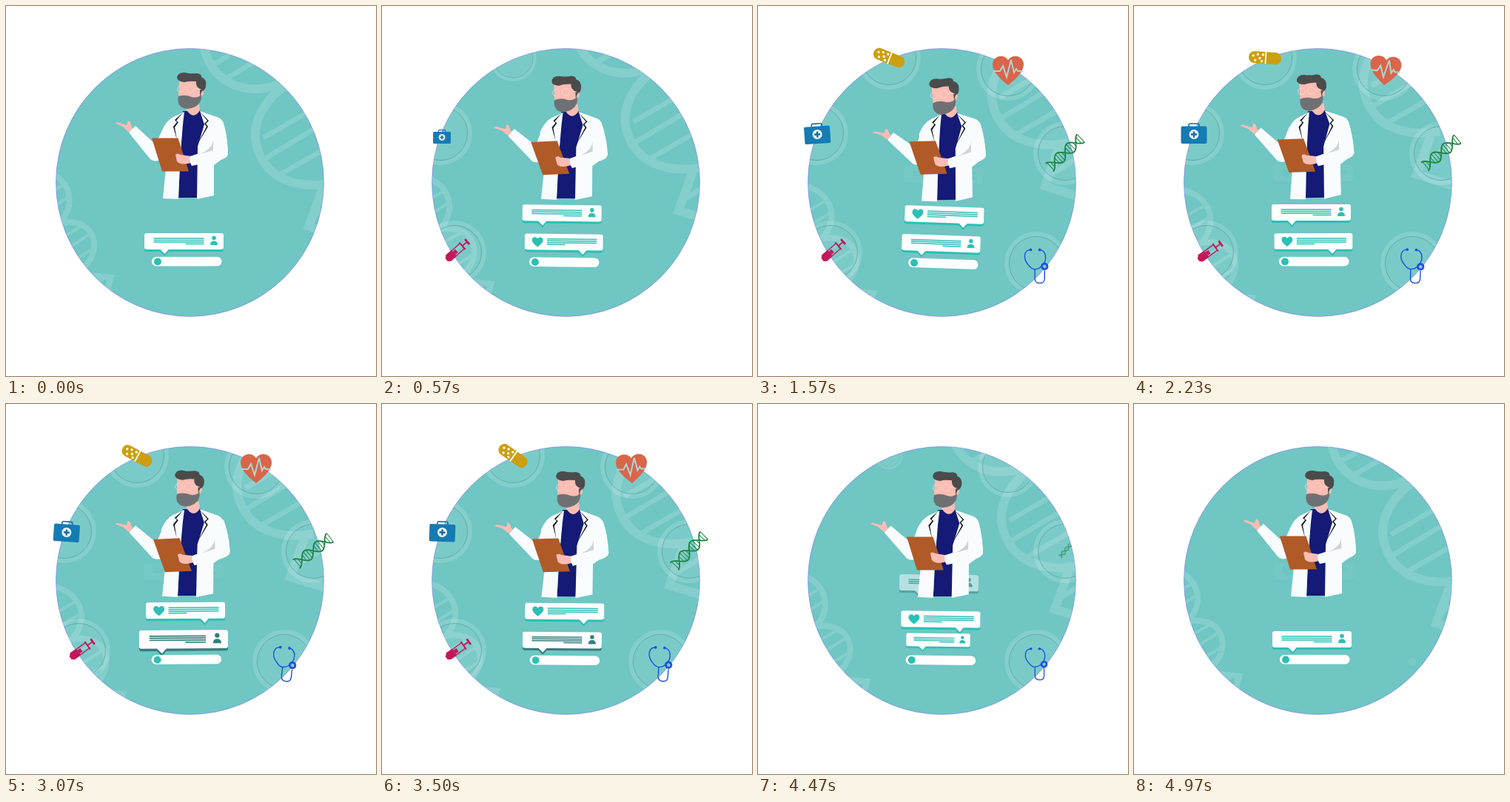
Write an HTML page that moves like this. It is 500 px wide and 500 px high and loops after 5010 ms.

```html
<!DOCTYPE html>
<html lang="en">
<head>
<meta charset="utf-8">
<title>Online doctor</title>
<style>
html, body { margin: 0; width: 100%; height: 100%; overflow: hidden; background: #fff; }
svg { display: block; width: 100vw; height: 100vh; }
</style>
</head>
<body>
<svg viewBox="0 0 500 500">
  <defs>
    <clipPath id="disc"><circle cx="248.500" cy="238.500" r="181"/></clipPath>
    <path id="lines" d="M0 0h68M0 2.500h68M0 5h68" fill="none" stroke-width="1.500"/>
  </defs>

  <circle cx="248.500" cy="238.500" r="181" fill="#6fc6c3" stroke="#7c84e6" stroke-width=".7"/>

  <g clip-path="url(#disc)">
    <g id="helixRight" opacity=".15" fill="none" stroke="#fff" stroke-width="12">
      <path d="M250 -20C264 -8 262 30 268 58C278 98 312 117 350 111C374 106 392 96 440 60"/>
      <path d="M400 94C350 118 327 160 341 196C354 232 390 248 440 240"/>
      <path d="M428 246L409 298L470 317"/>
      <path stroke-width="7" d="M276 81L302 67M292 101L342 72M348 178L412 141M350 206L422 163M370 228L440 188M414 284L450 262"/>
    </g>
    <g id="helixLeft" opacity=".15" fill="none" stroke="#fff" stroke-width="8">
      <path d="M50 222C88 232 95 268 74 291M40 305C88 280 122 294 119 328C116 348 102 358 74 376"/>
      <path d="M101 363L142 367L134 392"/>
      <path stroke-width="4" d="M55 255L78 242M56 276L84 258M72 315L103 297M78 331L114 308M82 349L116 329M112 380L134 367"/>
    </g>
    <g id="rings"></g>
  </g>

  <g id="chat">
    <g id="messages"></g>
    <rect x="197" y="339" width="94.500" height="12.500" rx="6.200" fill="#fff"/>
    <circle cx="205" cy="345.500" r="5" fill="#2dbfb5"/>
  </g>

  <g id="torso">
    <path fill="#f9bdb3" d="M245 132H261L263 149Q254 156 243 149Z"/>
    <path fill="#141a75" d="M239 142L245 142Q254 154 262 141L268 150L272 162L258 259H233Z"/>
    <g id="backArm">
      <path fill="#f9bdb3" d="M147 158L151 157L163 161L165 155L168 157L170 164L175 167L169 172Q162 168 158 163Z"/>
      <path fill="#f8fcfe" d="M175 162L202 187L211 168L226 158L217 204Q202 213 195 207L166 171Z"/>
    </g>
    <path fill="#f8fcfe" d="M241 143L226 150Q216 155 210 170L216 220L212 260L233 261L235 210L239 160Z"/>
    <path fill="#f8fcfe" d="M262 142L285 150Q292 152 294 159Q299 178 300 201L281 215V256L258 261L259 190L268 160Z"/>
    <path fill="#15191d" d="M239 144L228 154L231 157L226 163L231 181L228 164L233 157L230 155ZM261 142L272 155L268 159L271 163L258 188L273 163L270 159L274 155Z"/>
    <g id="frontArm">
      <path fill="#b05a28" d="M197 178.500H232.500L247 223.500H211Z"/>
      <path fill="#f9bdb3" d="M229 201Q231 198 236 201L250 203V212Q236 216 231 210Z"/>
      <path fill="#f8fcfe" d="M249 203L280 193L278 160L293 156Q299 172 300 199Q300 206 286 209L251 216Q247 209 249 203Z"/>
      <path fill="#cdd3d5" d="M280 181Q279 193 262 200L280 195Z"/>
    </g>
  </g>

  <g id="head">
    <path fill="#f9bdb3" d="M234 100L264 101V112Q268 112 267 118Q266 122 263 122L260 134H240L233 124Z"/>
    <path fill="#6e7173" d="M233 122Q242 119 251 123Q260 125 264 119Q265 131 256 136Q244 142 236 136Q231 131 233 122Z"/>
    <path fill="#4b4b4c" d="M231 97Q232 89 242 90Q248 92 258 91Q265 92 264 96Q272 99 270 109Q269 114 265 115L262 121V112Q256 109 257 102Q247 101 241 103Q232 102 231 97Z"/>
    <g fill="none" stroke="#fbd6d0" stroke-width=".8"><circle cx="236" cy="112" r="4.500"/><circle cx="249" cy="112" r="5"/><path d="M254 111L264 113"/></g>
  </g>

  <g id="icons"></g>
</svg>

<script>
const LOOP = 5010, STEP = 100 / 3;
const KEYS = [0, 570, 1570, 2230, 3070, 3930, 4970];
const $ = id => document.getElementById(id);
const clamp = v => Math.max(0, Math.min(1, v));

function add(parent, markup) {
  const g = document.createElementNS('http://www.w3.org/2000/svg', 'g');
  g.innerHTML = markup;
  return parent.appendChild(g);
}
const set = (el, transform) => el.setAttribute('transform', transform);

// Smooth curve through one value per key time, closing on the first value.
function track(t, values) {
  const n = values.length;
  const time = i => i < 0 ? KEYS[n - 1] - LOOP : i > n ? KEYS[1] + LOOP : KEYS[i];
  const value = i => values[(i + n) % n];
  const slope = i => (value(i + 1) - value(i - 1)) / (time(i + 1) - time(i - 1));
  let i = 0;
  while (i < n && t >= KEYS[i + 1]) i++;
  if (i >= n) return values[0];
  const d = KEYS[i + 1] - KEYS[i], u = (t - KEYS[i]) / d, w = 1 - u;
  return w * w * (1 + 2 * u) * value(i) + u * u * (3 - 2 * u) * value(i + 1)
    + d * u * w * (w * slope(i) - u * slope(i + 1));
}

function helixIcon() {
  const half = 29, y = x => 7.5 * Math.cos((x + half) * Math.PI / 19.5);
  let strands = ['', ''], rungs = '';
  for (let x = -half; x <= half; x += 2) {
    strands = strands.map((s, i) => `${s}${s ? 'L' : 'M'}${x} ${i ? -y(x) : y(x)}`);
    if (x % 4 === 1 || x % 4 === -3) rungs += `M${x} ${y(x)}V${-y(x)}`;
  }
  return `<g transform="rotate(-43)" fill="none" stroke="#1c8540"><path stroke-width="1.800" d="${strands.join('')}"/><path d="${rungs}"/></g>`;
}

const dots = [[-16, -2], [-13, 4], [-10, -4], [-7, 1], [-4, 5], [-3, -4]]
  .map(([x, y]) => `<circle cx="${x}" cy="${y}" r="1.700"/>`).join('');

// In order of appearance: ring centre, pivot of the icon, tilt at each key time.
const icons = [
  { ring: [98, 333], pivot: [87, 343], tilt: [-41, -41, -41, -36, -36, -36], art:
    `<g transform="scale(.92)" fill="#c2185b"><path d="M0 -2L4 -6H15V6H4L0 3Z"/><path d="M15 -5H31V5H15" fill="none" stroke="#c2185b" stroke-width="1.500"/>
     <path d="M15 -3H20V3H15ZM31 -1H40V1H31ZM30 -7H32V7H30ZM39 -5H42V5H39Z"/></g>` },
  { ring: [79, 172], pivot: [81, 186], tilt: [0, 0, -4, 0, 4, 0], art:
    `<path d="M-7 -23V-25Q-7 -27 -5 -27H5Q7 -27 7 -25V-23" fill="none" stroke="#176aa6" stroke-width="1.600"/>
     <rect x="-17.500" y="-23.500" width="35" height="23.500" rx="2" fill="#147bb3"/>
     <circle cy="-12.500" r="6.500" fill="#e9f7fa"/><path d="M-4 -12.500H4M0 -16.500V-8.500" stroke="#176aa6" stroke-width="2.500"/>` },
  { ring: [177, 70], pivot: [177, 70], tilt: [22, 22, 22, 4, 28, 37], art:
    `<rect x="-22" y="-8" width="44" height="16" rx="7.500" fill="#cc9f10"/><path d="M1 -8V8" stroke="#fff" stroke-width="1.800"/>
     <g fill="#fff8dc">${dots}</g>` },
  { ring: [338, 85], pivot: [338, 107], tilt: [0, 0, 0, 5, 0, -3], art:
    `<path d="M0 0C-10 -8 -21 -18 -21 -28C-21 -40 -6 -43 0 -34C6 -43 21 -40 21 -28C21 -18 10 -8 0 0Z" fill="#d9654a"/>
     <path d="M-20 -19H-11L-7 -26L-2 -11L4 -34L8 -17L11 -22L13 -19H20" fill="none" stroke="#a9d8d2" stroke-width="2"/>` },
  { ring: [415, 199], pivot: [415, 198.5], tilt: [0, 0, 0, 3, 5, -10], art: helixIcon() },
  { ring: [376, 348], pivot: [376, 351], tilt: [0, 0, 0, 2, 6, 0], art:
    `<g transform="scale(.94)"><g fill="none" stroke="#1f50e0" stroke-width="1.500"><path d="M-9 -23C-18 -22 -19 -10 -12 -2Q-7 5 -2 5Q5 5 10 -2C16 -10 14 -22 5 -23"/>
     <path d="M-2 5V18Q-2 25 5 25Q12 25 12 18V7"/><circle cx="12" cy="1" r="4" stroke-width="3"/></g>
     <g fill="#1f50e0"><circle cx="-8" cy="-23" r="2"/><circle cx="5" cy="-23" r="2"/></g></g>` }
];
for (const icon of icons) {
  icon.halo = add($('rings'), `<circle r="43" fill="#fff" fill-opacity=".08"/>
    <circle r="39.500" fill="none" stroke="#fff" stroke-opacity=".08" stroke-width="7"/>
    <circle r="36.500" fill="none" stroke="#4f9d9a" stroke-width=".7"/>`);
  icon.el = add($('icons'), icon.art);
}

function bubble(heart, color) {
  const tail = heart ? 25 : -27;
  const shape = `<rect x="-53.500" y="-11" width="107" height="22" rx="3"/><path d="M${tail - 6} 10h13l-6 7z"/>`;
  const badge = heart
    ? `<path transform="translate(-36 7)" d="M0 0C-4 -3 -7.500 -6 -7.500 -9C-7.500 -14 -2 -14.500 0 -11C2 -14.500 7.500 -14 7.500 -9C7.500 -6 4 -3 0 0Z"/>`
    : '<circle cx="40.500" cy="-4.500" r="2.800"/><path d="M35.500 5Q35.500 -.5 40.500 -.5Q45.500 -.5 45.500 5Z"/>';
  const x = heart ? -23 : -41;
  return `<g fill="${color}" transform="translate(0 3)">${shape}</g><g fill="#fff">${shape}</g><g fill="${color}">${badge}</g>
    <g stroke="${color}"><use href="#lines" x="${x}" y="-4"/><path d="M${heart ? x : 2} 3.500h25" stroke-width="1.500"/></g>`;
}

const TEAL = '#2dbfb5', DEEP = '#327f7c';
const messages = [
  { born: -600, up: 280, out: 1230 },
  { born: 280, up: 1230, out: 1950, heart: true },
  { born: 1230, up: 1950, out: 2940 },
  { born: 1950, up: 2940, out: 3740, heart: true },
  { born: 2940, up: 3740, out: 4410, color: DEEP },
  { born: 3740, up: 4410, out: 4600, heart: true },
  { born: 4410, up: 5290, out: 6240 }
];
for (const m of messages) m.el = add($('messages'), bubble(m.heart, m.color || TEAL));

const easeOut = p => 1 - (1 - clamp(p)) ** 2;
const pop = ms => ms <= 0 ? 0 : 1 - Math.exp(-ms / 68) * Math.cos(ms * Math.PI / 160);
const grow = (t, start, end) => easeOut((t - start) / 280) * (1 - clamp((t - end) / 280) ** 2);

function drawBackdrop(t) {
  const u = t / LOOP;
  const drift = (Math.sin(Math.PI * u) + 1 - Math.abs(2 * u - 1)) / 2;
  set($('helixRight'), `translate(${-29 * drift} ${-75 * drift})`);
  set($('helixLeft'), `translate(${19 * drift} ${29 * drift})`);
}

function drawDoctor(t) {
  const at = (...values) => track(t, [0, ...values]);
  const shift = `translate(${at(3, 9, -1, -1, 7)} ${at(1, 3, 0, 0, 2)})`;
  set($('chat'), `${shift} rotate(${at(.7, 2, 0, -.4, 1.3)} 246 260)`);
  set($('torso'), `${shift} rotate(${at(.3, -1, -1.5, .5, .7)} 246 260)`);
  set($('backArm'), `rotate(${at(-5, -7, -1, -4, -6)} 215 160)`);
  set($('frontArm'), `translate(${at(2, 0, 0, 3.5, .5)} 0) rotate(${at(-3, -.5, -.5, -3, -1)} 288 203)`);
  set($('head'), `translate(${at(1, 5, -7, -2, 8.5)} ${at(4, 7, 2, -.5, 2.5)}) rotate(${at(-4, -7, -6, -1, 0)} 250 137)`);
}

function drawMessages(t) {
  for (const m of messages) {
    const gone = t - m.out;
    const y = 318 - 39 * easeOut((t - m.up) / 120) - 53 * easeOut(gone / 120);
    const opacity = gone < 0 ? 1 : gone > 390 ? 0 : Math.max(.04, 1 - gone / 110);
    set(m.el, `translate(${m.heart ? 243.5 : 240.5} ${y}) scale(${pop(t - m.born)})`);
    m.el.setAttribute('opacity', opacity);
  }
}

function drawIcons(t) {
  icons.forEach((icon, i) => {
    const start = 100 + 165 * i, end = 3645 + 150 * i;
    set(icon.halo, `translate(${icon.ring}) scale(${grow(t, start, end + 308)})`);
    set(icon.el, `translate(${icon.pivot}) rotate(${track(t, icon.tilt)}) scale(${grow(t, start + 180, end)})`);
  });
}

function draw(t) {
  drawBackdrop(t);
  drawDoctor(t);
  drawMessages(t);
  drawIcons(t);
}

const origin = performance.now();
function tick() {
  const t = (performance.now() - origin) % LOOP;
  draw(Math.floor((t + 5) / STEP) * STEP);
  requestAnimationFrame(tick);
}
tick();
</script>
</body>
</html>
```
